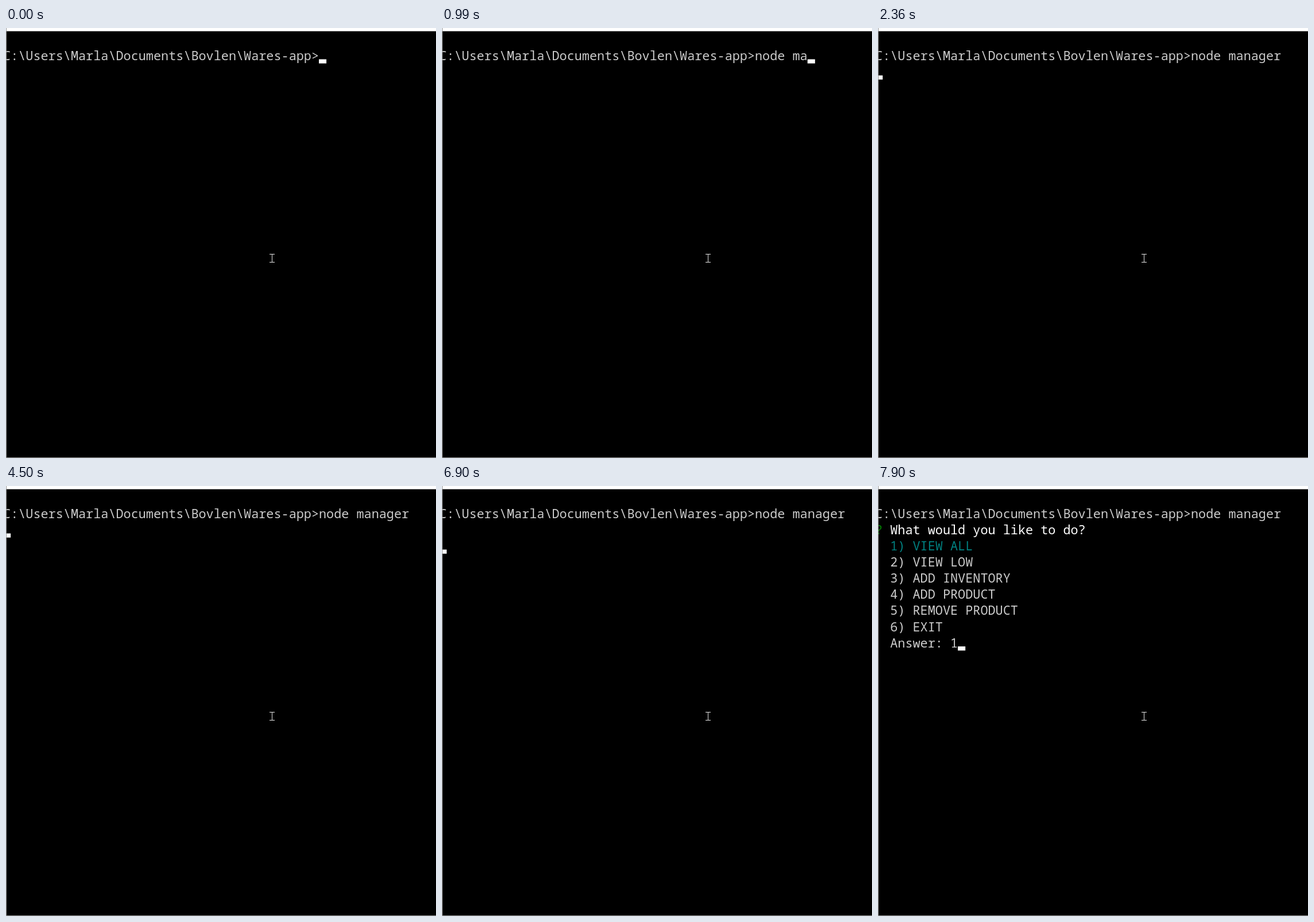
Animation of 749x748 px, one loop 8 s. Source, as an HTML page with a canvas:

```html
<!DOCTYPE html>
<html lang="en">
<head>
<meta charset="utf-8">
<title>Terminal</title>
<style>
  html, body { margin: 0; width: 100%; height: 100%; overflow: hidden; background: #000; }
  canvas { display: block; }
</style>
</head>
<body>
<canvas id="stage" width="749" height="748"></canvas>
<script>
const ctx = document.getElementById("stage").getContext("2d");
const LOOP = 8000;
const CELL = 13.094, LEFT = -4.94, ROW = 28.08, BASE = 56;
const SILVER = "#ccc", WHITE = "#fff", TEAL = "#008080", GREEN = "#008000", EDGE = "#999";

const PROMPT = "C:\\Users\\Marla\\Documents\\Bovlen\\Wares-app>";
const COMMAND = "node manager";
const MENU = ["1) VIEW ALL", "2) VIEW LOW", "3) ADD INVENTORY", "4) ADD PRODUCT",
  "5) REMOVE PRODUCT", "6) EXIT", "Answer:"];
const MENU_AT = 7020, ANSWER_AT = 7900;

// [time, value] steps; each value holds until the next step
const TYPED = [[0, 0], [500, 2], [750, 4], [870, 5], [990, 7], [1110, 9],
  [1250, 10], [1370, 11], [1490, 12]];
const INPUT = -1;
// cursor as [column, row], INPUT for the end of the command, null when hidden
const CURSOR = [[0, INPUT], [250, null], [500, INPUT], [1740, null],
  [2360, [0, 1]], [2860, null], [3360, [0, 1]], [3860, null],
  [4500, [0, 1]], [5000, null], [5500, [0, 1]], [6000, null],
  [6500, [0, 1]], [6900, [0, 2]], [7020, null], [7650, [10, 8]], [7900, [11, 8]]];

function valueAt(steps, t) {
  let value = steps[0][1];
  for (const [start, v] of steps) if (t >= start) value = v;
  return value;
}

function rect(color, x, y, w, h) {
  ctx.fillStyle = color;
  ctx.fillRect(x, y, w, h);
}

const colX = col => LEFT + col * CELL;

function write(text, col, row, color = SILVER) {
  ctx.fillStyle = color;
  const y = Math.round(BASE + row * ROW);
  [...text].forEach((ch, i) => ctx.fillText(ch, colX(col + i), y));
}

function drawCursor([col, row]) {
  rect(WHITE, colX(col), 54.4 + row * ROW, CELL, 7.2);
}

function drawMenu() {
  write("?", 0, 1, GREEN);
  write("What would you like to do?", 2, 1, WHITE);
  MENU.forEach((item, i) => write(item, 2, i + 2, i ? SILVER : TEAL));
}

function drawPointer() {
  const color = "#e4e4e4";
  rect(color, 459, 393, 9, 1);
  rect(color, 463, 393, 1, 15);
  rect(color, 459, 407, 9, 1);
}

function drawFrame() {
  rect(WHITE, 0, 0, 749, 5);
  rect(EDGE, 0, 5, 749, 1);
  rect(EDGE, 0, 0, 1, 748);
  rect(EDGE, 0, 747, 749, 1);
}

function draw(t) {
  rect("#000", 0, 0, 749, 748);
  ctx.font = '21.82px "Noto Sans Mono", monospace';
  const typed = valueAt(TYPED, t);
  write(PROMPT + COMMAND.slice(0, typed), 0, 0);
  if (t >= MENU_AT) drawMenu();
  if (t >= ANSWER_AT) write("1", 10, 8);
  const cursor = valueAt(CURSOR, t);
  if (cursor) drawCursor(cursor === INPUT ? [PROMPT.length + typed, 0] : cursor);
  drawPointer();
  drawFrame();
}

const start = performance.now();
function tick() {
  draw((performance.now() - start) % LOOP);
  requestAnimationFrame(tick);
}
tick();
</script>
</body>
</html>
```
